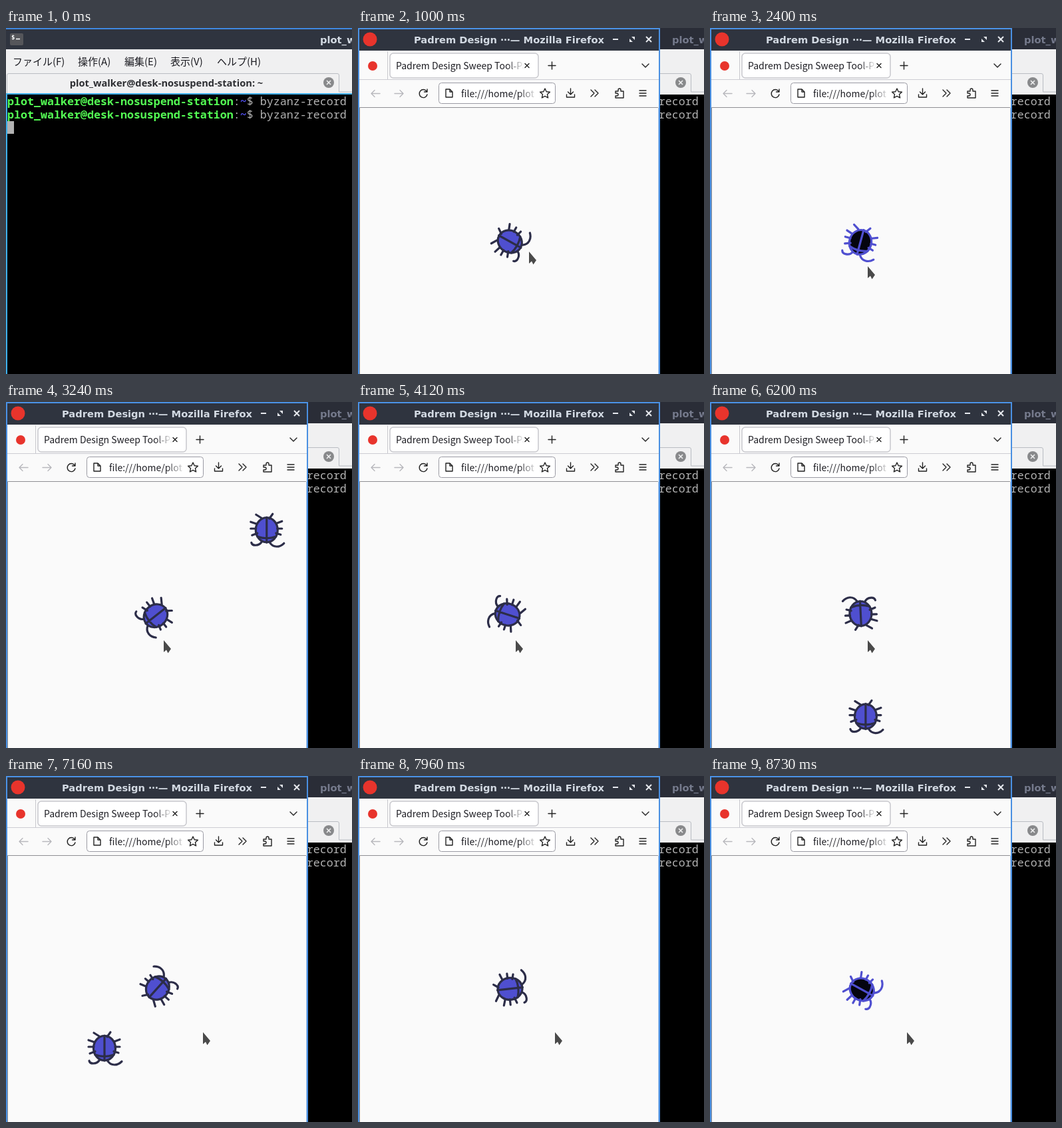
These frames come from a looping animation (520 px wide and 520 px high, 8.75 s). An HTML page:

```html
<!DOCTYPE html>
<html lang="ja">
<head>
<meta charset="utf-8">
<title>Bug orbit</title>
<style>
html, body { margin: 0; width: 100%; height: 100%; overflow: hidden; background: #000; }
svg { display: block; }
text { white-space: pre; }
.ui { font-family: "Noto Sans CJK JP", "Noto Sans CJK", "Noto Sans", sans-serif; fill: #1c1c22; }
.title { font: bold 14.67px "DejaVu Sans", sans-serif; fill: #d3dae3; }
.mono { font: 16.67px "Noto Sans Mono", monospace; fill: #b2b2b2; }
.mono .user { font-weight: bold; fill: #54ff54; }
.mono .dir { font-weight: bold; fill: #5454ff; }
.line { fill: none; stroke: #222; stroke-width: 1.4; stroke-linecap: round; stroke-linejoin: round; }
.bug { fill: #4f4fd0; stroke: #2c2d48; stroke-width: 3.2; stroke-linecap: round; }
.bug.dark { fill: #05050f; stroke: #4f4fd0; }
</style>
</head>
<body>
<svg width="520" height="520" viewBox="0 0 520 520">
  <defs>
    <linearGradient id="fade"><stop stop-color="#fff" stop-opacity="0"/><stop offset="1" stop-color="#fff"/></linearGradient>
    <g id="bugShape" transform="translate(0 3)">
      <ellipse cy="-1" rx="16.5" ry="18.5"/>
      <path fill="none" d="M-16-24L-8-19M9-25L4-18M-24-13L-15-10M23-14L15-11M-24-3H-16M23-3H16M-22 7L-14 4M21 6L14 4M-7 16Q-10 22-17 22Q-22 22-23 18M4 17Q8 24 15 24Q21 24 26 19M0-20V18M-14 9Q0 14 14 9"/>
    </g>
  </defs>

  <!-- terminal -->
  <rect width="520" height="520"/>
  <rect id="termBar" width="520" height="32" fill="#2f343f"/>
  <rect id="termTop" width="520" height="2" fill="#3f86dc"/>
  <rect x="6" y="8" width="20" height="18" rx="2" fill="#55565a"/>
  <text x="8" y="17" font-family="DejaVu Sans Mono, monospace" font-size="9" font-weight="bold" fill="#fff">$</text>
  <path d="M15 16.5h6" stroke="#fff" stroke-width="1.5"/>
  <text id="termTitle" class="title" x="472" y="23">plot_walker@desk</text>
  <rect y="32" width="520" height="66" fill="#f0f0f1"/>
  <g class="ui" font-size="15">
    <text x="10" y="56">ファイル(F)</text>
    <text x="108" y="56">操作(A)</text>
    <text x="178" y="56">編集(E)</text>
    <text x="247" y="56">表示(V)</text>
    <text x="317" y="56">ヘルプ(H)</text>
  </g>
  <path d="M1.500 98V71q0-2.500 2.500-2.500H498q2.500 0 2.500 2.500V96H520" fill="none" stroke="#b9bcc2"/>
  <text x="241" y="88" text-anchor="middle" font-family="Noto Sans, sans-serif" font-size="14.67" font-weight="bold" fill="#2e2f33">plot_walker@desk-nosuspend-station: ~</text>
  <circle cx="485" cy="82" r="8" fill="#88898b"/>
  <path d="M482 79l6 6m0-6l-6 6" stroke="#f0f0f1" stroke-width="1.6"/>
  <path id="termEdge" d="M1 520V99H520" fill="none" stroke="#3daee9" stroke-width="2"/>
  <g class="mono">
    <text x="2" y="116"><tspan class="user">plot_walker@desk-nosuspend-station</tspan>:<tspan class="dir">~</tspan>$ byzanz-record</text>
    <text x="2" y="136"><tspan class="user">plot_walker@desk-nosuspend-station</tspan>:<tspan class="dir">~</tspan>$ byzanz-record</text>
  </g>
  <rect x="2" y="140" width="10" height="19" fill="#b2b2b2"/>

  <!-- browser -->
  <g id="browser">
    <rect width="454" height="520" fill="#4a90e2"/>
    <path d="M451.500 119V520" stroke="#a9c6ea"/>
    <rect x="2" y="2" width="450" height="32" fill="#2f343f"/>
    <circle cx="18" cy="17" r="10.500" fill="#e8342c"/>
    <text class="title" x="84" y="23">Padrem Design ⋯— Mozilla Firefox</text>
    <path d="M383 17h8M433 13l8 8m0-8l-8 8" stroke="#e6e9ee" stroke-width="2"/>
    <path d="M411 13h5v5zM408 16v5h5z" fill="#e6e9ee"/>

    <rect x="2" y="34" width="450" height="86" fill="#fafafa"/>
    <path d="M2 77.500H452" stroke="#ccccd2"/>
    <path d="M44.500 35V77" stroke="#c8c8cd"/>
    <circle cx="22" cy="57" r="7" fill="#e8342c"/>
    <rect x="48" y="38" width="223" height="37" rx="5" fill="#fff" stroke="#c8c8cd" stroke-width="1.5"/>
    <text class="ui" x="57" y="62" font-size="14">Padrem Design Sweep Tool-Pa</text>
    <rect x="224" y="42" width="26" height="29" fill="url(#fade)"/>
    <rect x="249" y="42" width="19" height="29" fill="#fff"/>
    <path class="line" d="M251 53.500l6 6m0-6l-6 6M286 56.500h11m-5.500-5.500v11M427 54l5 5 5-5"/>

    <path class="line" style="stroke:#b8b8bd" d="M33 98.500H20m5-5l-5 5 5 5M55 98.500H68m-5-5l5 5-5 5"/>
    <path class="line" d="M103 95a6 6 0 1 0 1 5M104 92v4h-4.500"/>
    <rect x="121.500" y="82.500" width="175" height="31" rx="4" fill="#fff" stroke="#9a9aa3"/>
    <path class="line" d="M132 92h6l4 4v8h-10zM138 92v4h4"/>
    <text class="ui" x="155" y="104" font-size="14">file:///home/plot</text>
    <rect x="240" y="86" width="30" height="25" fill="url(#fade)"/>
    <path class="line" d="M281 91l2.200 4.700 5.200.6-3.900 3.500 1.100 5.200-4.600-2.600-4.600 2.600 1.100-5.200-3.900-3.500 5.200-.6z"/>
    <path class="line" d="M319.500 91v9m-4-4l4 4 4-4M313.500 100v4h12v-4M350 93l5 5-5 5M356 93l5 5-5 5"/>
    <path class="line" d="M387 95h4v-2a2 2 0 0 1 4 0v2h4v10h-12v-3h2a2 2 0 0 0 0-4h-2zM423 94h10M423 98h10M423 102h10"/>
    <rect x="2" y="119" width="449" height="401" fill="#fafafa"/>
    <path d="M2.500 520V119.500H451" fill="none" stroke="#8e8e93"/>

    <use id="mover" class="bug" href="#bugShape"/>
    <use id="watcher" class="bug" href="#bugShape"/>
    <path id="pointer" d="M0 0V18L4 14.500 6.500 19.500 11 13Z" fill="#4a4a4a" stroke="#fff" stroke-width="1.500" paint-order="stroke"/>
  </g>
</svg>
<script>
const LOOP = 8750, STEP = 40, OPEN = 400, LAP = 7730;
const HOME = [226.5, 320];
const $ = id => document.getElementById(id);

// Each key is [time, x, y].
const orbit = [
  [1000, 72, 234], [1280, 77, 178], [2000, 211, 178], [2400, 260, 197],
  [3000, 363, 197], [3200, 392, 182], [4120, 387, 372], [4760, 341, 403],
  [5400, 313, 454], [6000, 250, 482], [6560, 205, 450], [7160, 148, 407],
  [7950, 50, 342], [8400, 57, 267], [8730, 72, 234]
];
const pointerPath = [
  [1280, 257, 336], [1700, 237, 358], [6560, 237, 358],
  [6840, 315, 380], [7100, 296, 385]
];

function along(keys, t) {
  const i = keys.findIndex(k => k[0] > t);
  if (i === 0) return keys[0].slice(1);
  if (i < 0) return keys.at(-1).slice(1);
  const [t0, x0, y0] = keys[i - 1], [t1, x1, y1] = keys[i];
  const p = (t - t0) / (t1 - t0);
  return [x0 + (x1 - x0) * p, y0 + (y1 - y0) * p];
}

function place(id, [x, y], turn = 0) {
  $(id).setAttribute("transform", `translate(${x} ${y}) rotate(${turn})`);
}

function show(id, on) {
  $(id).style.display = on ? "" : "none";
}

function draw(t) {
  const open = t >= OPEN;
  show("browser", open);
  $("termBar").style.fill = open ? "#2a2d37" : "";
  $("termTop").style.fill = open ? "#2a2d37" : "";
  $("termTitle").style.fill = open ? "#757a8c" : "";
  $("termEdge").style.stroke = open ? "#f0f0f1" : "";

  const spot = along(orbit, t < 1000 ? t + LAP : t);
  const angle = Math.atan2(spot[1] - HOME[1], spot[0] - HOME[0]) * 180 / Math.PI;
  place("mover", spot);
  show("mover", t % 240 >= 120);
  place("watcher", HOME, angle + 90); // always faces the mover
  $("watcher").classList.toggle("dark", t % 1000 >= 250 && t % 1000 < 750);
  place("pointer", along(pointerPath, t));
}

const start = performance.now();
function frame() {
  const t = (performance.now() - start) % LOOP;
  draw(Math.floor(t / STEP) * STEP);
  requestAnimationFrame(frame);
}
frame();
</script>
</body>
</html>
```
